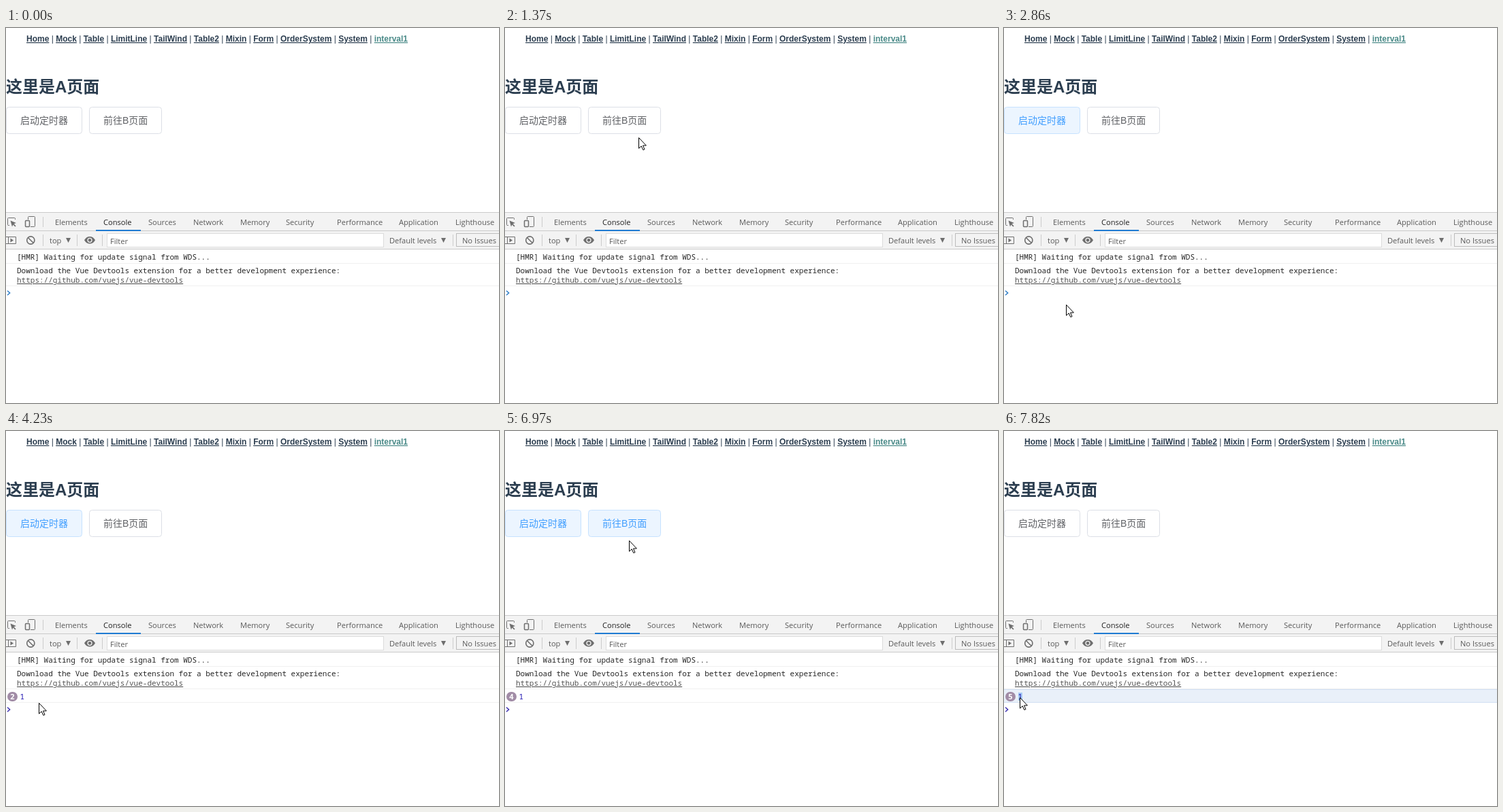
Recreate the animation shown at these times as an HTML page. Size 724 by 552 pixels, loop 7990 ms.

```html
<!DOCTYPE html>
<html lang="zh">
<head>
<meta charset="utf-8">
<title>Console timer</title>
<style>
html, body { margin: 0; width: 100%; height: 100%; overflow: hidden; background: #fff; }
svg { display: block; }
text { white-space: pre; }
.page { font-family: "Liberation Sans", "Noto Sans CJK SC", "Noto Sans CJK", sans-serif; fill: #2c3e50; }
.nav { font-size: 12px; }
.nav tspan { font-weight: bold; text-decoration: underline; }
.nav .on { fill: #4a8a88; }
.h { font-size: 24px; font-weight: bold; }
.btn rect { fill: #fff; stroke: #dcdfe6; }
.btn text { font-size: 14px; fill: #606266; }
.btn.hot rect { fill: #ecf5ff; stroke: #c6e2ff; }
.btn.hot text { fill: #409eff; }
.btn.down rect { stroke: #3a8ee6; }
.btn.down text { fill: #3a8ee6; }
.ui { font: 11.1px "Open Sans", "Noto Sans", sans-serif; fill: #5a5a5a; }
.log { font: 11px "Noto Sans Mono", "DejaVu Sans Mono", monospace; fill: #262626; }
.line { fill: none; stroke: #6e6e6e; }
.crisp { shape-rendering: crispEdges; }
</style>
</head>
<body>
<svg width="724" height="552" viewBox="0 0 724 552">
  <g class="page">
    <text class="nav" id="nav" x="30" y="20"></text>
    <text class="h" x="0" y="95">这里是A页面</text>
    <g class="btn" id="start">
      <rect x=".5" y="116.5" width="111" height="39" rx="4"/>
      <text x="21" y="141">启动定时器</text>
    </g>
    <g class="btn" id="go">
      <rect x="122.5" y="116.5" width="106" height="39" rx="4"/>
      <text x="143" y="141">前往B页面</text>
    </g>
  </g>

  <!-- devtools bars -->
  <g class="crisp">
    <rect y="271" width="724" height="55" fill="#f3f3f3"/>
    <path d="M0 271.5H724M0 298.5H724M0 325.5H724" stroke="#cacaca"/>
    <path d="M54.5 278V293M54.5 304V321M104.5 304V321M141.5 304V321M656.5 304V321" stroke="#ccc"/>
    <rect x="132" y="297" width="66" height="2" fill="#1f7bd2"/>
    <rect x="148.5" y="302.5" width="406" height="20" fill="#fff" stroke="#dcdcdc"/>
    <rect x="661.5" y="302.5" width="80" height="19" fill="#f3f3f3" stroke="#bdbdbd"/>
    <path d="M0 346.5H724M0 379.5H724" stroke="#f0f0f0"/>
  </g>
  <g class="ui" id="bar"></g>
  <path d="M88 309h7l-3.5 7zM639 309h7l-3.5 7z" fill="#6e6e6e"/>

  <!-- icons -->
  <g class="line">
    <path d="M5 290.5H3.5Q2.5 290.5 2.5 289.5V280.5Q2.5 279.5 3.5 279.5H12.5Q13.5 279.5 13.5 280.5V282"/>
    <path d="M6.5 283.5L15 287L11.6 288.2L14.6 291.4L13.4 292.6L10.4 289.4L9 292.5Z" fill="#6e6e6e" stroke="none"/>
    <path d="M32.5 282V278.5Q32.5 277.5 33.5 277.5H41.5Q42.5 277.5 42.5 278.5V291.5Q42.5 292.5 41.5 292.5H36"/>
    <rect x="28.5" y="283.5" width="6" height="9" rx="1" stroke-width="1.5"/>
    <path d="M0 307.5H14.5V317.5H0M3.5 307.5V317.5"/>
    <path d="M6.5 309.5V315.5L11 312.5Z" fill="#6e6e6e" stroke="none"/>
    <circle cx="36.3" cy="312.5" r="5.6" stroke-width="1.6"/>
    <path d="M32.3 308.5L40.3 316.5" stroke-width="1.6"/>
  </g>
  <g id="eye" fill="#6e6e6e">
    <path d="M115 312.3Q118 307 123 307T131 312.3Q128 317.6 123 317.6T115 312.3Z"/>
    <circle cx="123" cy="312.3" r="3" fill="none" stroke="#f3f3f3" stroke-width="1.3"/>
  </g>

  <!-- console -->
  <g class="log">
    <text x="16" y="341">[HMR] Waiting for update signal from WDS...</text>
    <text x="16" y="361">Download the Vue Devtools extension for a better development experience:</text>
    <text x="16" y="375" fill="#545454" text-decoration="underline">https://github.com/vuejs/vue-devtools</text>
    <g id="entry">
      <path class="crisp" d="M0 399.5H724" stroke="#f0f0f0"/>
      <g id="chosen" class="crisp">
        <rect y="380" width="724" height="20" fill="#e9f0f9"/>
        <path d="M0 380.5H724M0 399.5H724" stroke="#d0dff3"/>
      </g>
      <rect id="mark" x="21" y="385" width="6" height="12" fill="#a6caf5"/>
      <text id="value" y="395" fill="#1c10b0">1</text>
      <g id="badge">
        <rect x="2" y="384" width="15" height="14" rx="7" fill="#a18ca6"/>
        <text id="count" x="9.5" y="395" text-anchor="middle" fill="#fff" font-family="Open Sans, sans-serif" font-weight="bold"></text>
      </g>
    </g>
  </g>
  <path id="prompt" d="M2 386.8L5.6 390L2 393.2" fill="none" stroke-width="1.5"/>

  <!-- pointer -->
  <g id="pointer" fill="#fff" stroke="#000" stroke-linejoin="round">
    <circle id="press" r="12" fill="#ff0" fill-opacity=".47" stroke="none"/>
    <path id="arrow" d="M.5 .5V16.2L4.2 12.8L6.8 18.5L9 17.6L6.5 12H11.4Z"/>
    <path id="hand" transform="translate(-7)" d="M6 13.5V2a1.5 1.5 0 0 1 3 0V8q0-1 1.5-1t1.5 1.5q0-1 1.5-1t1.5 1.5q.2-.7 1-.5t.5 1.5V15q0 3-2 6.5H7.5Q6 18 4 15.5Q.5 12 .5 11.5t1.5-1.2Q4 11 6 13.5z"/>
  </g>
</svg>
<script>
const LOOP = 7990, STEP = 77;
const $ = id => document.getElementById(id);

$('nav').innerHTML = 'Home Mock Table LimitLine TailWind Table2 Mixin Form OrderSystem System interval1'
  .split(' ')
  .map(s => `<tspan${s === 'interval1' ? ' class="on"' : ''}>${s}</tspan>`)
  .join(' | ');

const label = (s, x, y, fill = '#5a5a5a') => `<text x="${x}" y="${y}" fill="${fill}">${s}</text>`;
const tabs = { Elements: 72, Console: 143, Sources: 209, Network: 275, Memory: 344,
  Security: 411, Performance: 486, Application: 577, Lighthouse: 660 };
$('bar').innerHTML =
  Object.entries(tabs).map(([s, x]) => label(s, x, 290, s === 'Console' ? '#222' : undefined)).join('') +
  label('top', 64, 317) + label('Filter', 153, 318) +
  label('Default levels', 563, 317) + label('No Issues', 670, 317);

// pointer glides: first step, number of steps, end point
const glides = [
  [70, 2, 606, 439], [390, 3, 509, 240], [750, 3, 407, 222],
  [1140, 4, 196, 161], [1450, 2, 116, 160], [1610, 3, 82, 136],
  [2460, 4, 91, 405], [2860, 1, 91, 407], [2930, 2, 65, 405],
  [3230, 4, 48, 400], [4480, 3, 41, 394],
  [5650, 3, 142, 302], [5880, 2, 248, 175], [6040, 3, 191, 141],
  [6970, 1, 182, 161], [7050, 2, 100, 428], [7200, 2, 45, 399], [7430, 3, 23, 392]
];

function pointerAt(t) {
  let x = 664, y = 511;
  for (const [from, steps, endX, endY] of glides) {
    if (t < from) break;
    // the 10 ms lead keeps each step from landing late
    const done = Math.min(1, Math.floor((t - from + 10) / STEP + 1) / steps);
    x += (endX - x) * done;
    y += (endY - y) * done;
  }
  return [x, y];
}

function buttonAt([x, y]) {
  if (y < 116 || y >= 156) return '';
  return x < 112 ? 'start' : x >= 122 && x < 229 ? 'go' : '';
}

const show = (id, on) => $(id).setAttribute('visibility', on ? 'inherit' : 'hidden');

function draw() {
  const t = performance.now() % LOOP;
  const during = (a, b) => t >= a && t < b;
  const spot = pointerAt(t);
  const over = buttonAt(spot);
  const lit = buttonAt(pointerAt(t - STEP));  // hover colour follows one step later
  const n = Math.max(0, Math.floor((t - 2200) / 995));

  show('pointer', t >= 70);
  $('pointer').setAttribute('transform', `translate(${spot.map(Math.round)})`);
  show('arrow', !over);
  show('hand', over);
  show('press', during(2150, 2300) || during(7590, 7820));

  $('start').classList.toggle('hot', lit === 'start' || during(2150, 7590));
  $('start').classList.toggle('down', during(2150, 2300));
  $('go').classList.toggle('hot', lit === 'go');
  $('eye').setAttribute('fill', during(5800, 5880) ? '#303030' : '#6e6e6e');

  show('entry', n > 0);
  show('badge', n > 1);
  show('chosen', t >= 7590);
  show('mark', t >= 7670);
  $('value').setAttribute('x', n > 1 ? 20.5 : 16);
  $('count').textContent = n;
  $('prompt').setAttribute('transform', `translate(0 ${n ? 20 : 0})`);
  $('prompt').setAttribute('stroke', n ? '#3b2fb0' : '#2f7ec7');
  requestAnimationFrame(draw);
}
draw();
</script>
</body>
</html>
```
